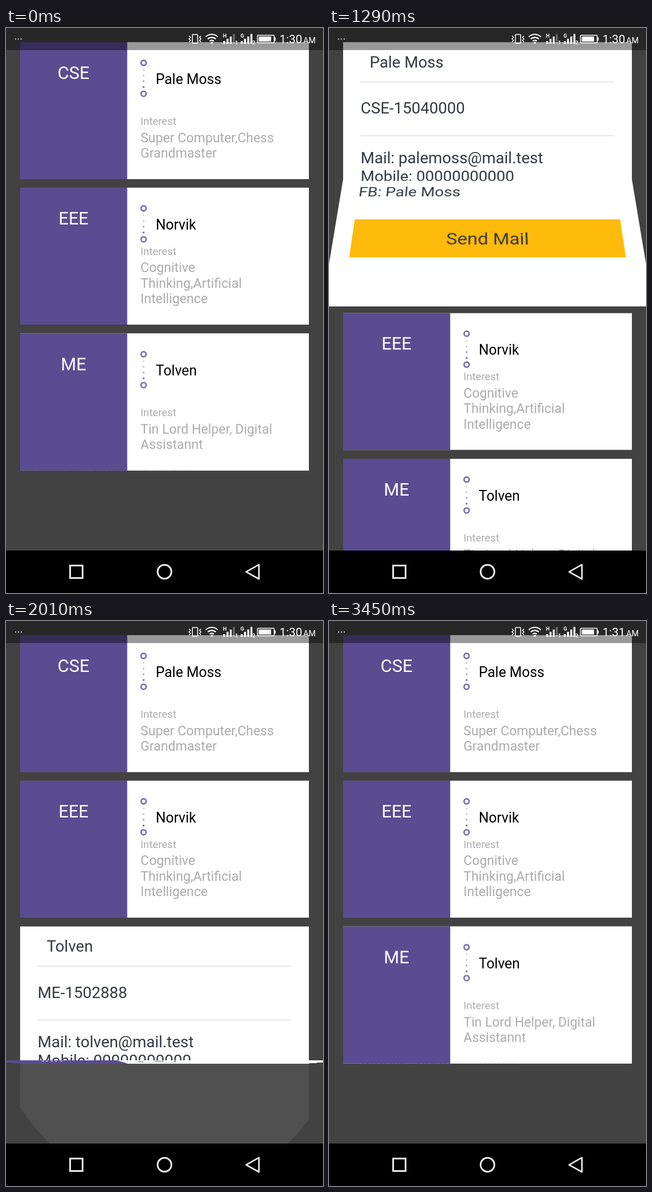
An HTML page that plays this animation: 561x998 px, repeating every 3.51 s.

```html
<!DOCTYPE html>
<html lang="en">
<head>
<meta charset="utf-8">
<title>Folding cards</title>
<style>
@property --turn { syntax: "<angle>"; inherits: true; initial-value: 0deg; }

html, body { margin: 0; width: 100%; height: 100%; overflow: hidden; background: #424242; }
.stage {
  position: relative; width: 561px; height: 998px; overflow: hidden;
  background: #424242; font-family: Roboto, sans-serif;
  --loop: 3510ms; --ease: cubic-bezier(.3333, .6667, .6667, 1);
}
.stage svg { display: block; position: absolute; }
.stage text { font-family: Roboto, sans-serif; white-space: pre; }

.cell { position: absolute; left: 25px; width: 511px; height: 242px; }
.one { top: 25px; animation: fold-one var(--loop) var(--ease) infinite; }
.two { top: 282px; }
.three { top: 540px; translate: 0 -.4px; animation: fold-three var(--loop) var(--ease) infinite; }
.rest { position: absolute; left: 0; top: 0; width: 561px; animation: push var(--loop) var(--ease) infinite; }

.face { left: 0; top: 0; width: 511px; height: 242px; overflow: hidden; }
.cover {
  transform-origin: 50% 100%;
  transform: perspective(1122px) rotateX(calc(-1 * min(var(--turn), 90deg)));
}
.flap {
  top: 242px; height: 243px; transform-origin: 50% 0;
  transform: perspective(1122px) rotateX(min(180deg - var(--turn), 90deg));
}
.ripple {
  position: absolute; left: 0; top: 0; width: 511px; height: 242px; background: #fff; opacity: 0;
  animation: ripple var(--loop) linear infinite, stretch var(--loop) var(--ease) infinite;
}
.three .ripple { animation-delay: -1743ms; }

.tag { font-size: 31.2px; fill: #fff; text-anchor: middle; }
.name { font-size: 24.9px; fill: #000; }
.hint { font-size: 18.7px; fill: #acacac; }
.note { font-size: 23.3px; fill: #acacac; }
.info { font-size: 28.04px; fill: #333a44; }
.send { font-size: 31.2px; fill: #333a44; text-anchor: middle; }

.bars { left: 0; top: 0; }
.early { animation: early var(--loop) step-end infinite; }
.late { opacity: 0; animation: late var(--loop) step-end infinite; }

@keyframes fold-one {
  0%, .598% { --turn: 0deg; }
  7.721% { --turn: 90deg; }
  14.843%, 35.57% { --turn: 180deg; }
  40.9% { --turn: 90deg; }
  46.23%, 100% { --turn: 0deg; }
}
@keyframes fold-three {
  0%, 50.94% { --turn: 0deg; }
  58.063% { --turn: 90deg; }
  65.185%, 87.664% { --turn: 180deg; }
  92.991% { --turn: 90deg; }
  98.319%, 100% { --turn: 0deg; }
}
@keyframes push {
  0%, .74% { transform: translateY(0); }
  14.985%, 36.296% { transform: translateY(243px); }
  46.952%, 100% { transform: translateY(0); }
}
@keyframes stretch {
  0%, .74% { height: 242px; }
  14.985%, 100% { height: 485px; }
}
@keyframes ripple {
  0%, .598% { opacity: 0; clip-path: circle(0 at 263px 158px); }
  2.5% { opacity: .074; }
  6.923% { opacity: .074; clip-path: circle(307px at 263px 158px); }
  9.402% { opacity: .025; clip-path: circle(420px at 263px 158px); }
  11.4%, 100% { opacity: 0; clip-path: circle(480px at 263px 158px); }
}
@keyframes early { 0% { opacity: 1; } 93.16%, 100% { opacity: 0; } }
@keyframes late { 0% { opacity: 0; } 93.16%, 100% { opacity: 1; } }
</style>
</head>
<body>
<div class="stage">

  <svg width="0" height="0">
    <defs>
      <g id="title">
        <rect width="511" height="242" fill="#fff"/>
        <rect width="189.5" height="242" fill="#594c91"/>
        <g fill="none" stroke="#7467ab" stroke-width="2.6">
          <circle cx="218.5" cy="36.6" r="4.5"/>
          <circle cx="218.5" cy="91.2" r="4.5"/>
        </g>
        <g fill="#7467ab">
          <circle cx="218.5" cy="49" r="1.5" opacity=".35"/>
          <circle cx="218.5" cy="59" r="1.5" opacity=".5"/>
          <circle cx="218.5" cy="69" r="1.6" opacity=".7"/>
          <circle cx="218.5" cy="79.3" r="1.7" opacity=".95"/>
        </g>
      </g>
      <g id="sheet">
        <rect width="511" height="485" fill="#fff"/>
        <path d="M31 70.2h449M31 165.2h449" stroke="#dfdfdf" stroke-width="1.6"/>
        <rect x="31" y="326" width="449" height="73" fill="#ffbb0b"/>
        <text class="send" x="255.5" y="375">Send Mail</text>
      </g>
      <g id="detail-one">
        <use href="#sheet"/>
        <g class="info">
          <text x="47" y="44.5">Pale Moss</text>
          <text x="31" y="126">CSE-15040000</text>
          <text x="31" y="213.6">Mail: palemoss@mail.test</text>
          <text x="31" y="246.5">Mobile: 00000000000</text>
          <text x="31" y="279.4">FB: Pale Moss</text>
        </g>
      </g>
      <g id="detail-three">
        <use href="#sheet"/>
        <g class="info">
          <text x="47" y="44.5">Tolven</text>
          <text x="31" y="126">ME-1502888</text>
          <text x="31" y="213.6">Mail: tolven@mail.test</text>
          <text x="31" y="246.5">Mobile: 00000000000</text>
          <text x="31" y="279.4">FB: Tolven</text>
        </g>
      </g>
    </defs>
  </svg>

  <div class="rest">
    <div class="cell two">
      <svg class="face" viewBox="0 0 511 242">
        <use href="#title"/>
        <text class="tag" x="94.5" y="65">EEE</text>
        <text class="name" x="240" y="74">Norvik</text>
        <text class="hint" x="213" y="119">Interest</text>
        <text class="note" x="213" y="149.2">Cognitive</text>
        <text class="note" x="213" y="176.7">Thinking,Artificial</text>
        <text class="note" x="213" y="204.2">Intelligence</text>
      </svg>
    </div>
    <div class="cell three">
      <div class="ripple"></div>
      <svg class="face" viewBox="0 0 511 242"><use href="#detail-three"/></svg>
      <svg class="face flap" viewBox="0 242 511 243"><use href="#detail-three"/></svg>
      <svg class="face cover" viewBox="0 0 511 242">
        <use href="#title"/>
        <text class="tag" x="94.5" y="64.8">ME</text>
        <text class="name" x="240" y="73.7">Tolven</text>
        <text class="hint" x="213" y="146">Interest</text>
        <text class="note" x="213" y="176.5">Tin Lord Helper, Digital</text>
        <text class="note" x="213" y="204">Assistannt</text>
      </svg>
    </div>
  </div>

  <div class="cell one">
    <div class="ripple"></div>
    <svg class="face" viewBox="0 0 511 242"><use href="#detail-one"/></svg>
    <svg class="face flap" viewBox="0 242 511 243"><use href="#detail-one"/></svg>
    <svg class="face cover" viewBox="0 0 511 242">
      <use href="#title"/>
      <text class="tag" x="94.5" y="65">CSE</text>
      <text class="name" x="240" y="73.5">Pale Moss</text>
      <text class="hint" x="213" y="146">Interest</text>
      <text class="note" x="213" y="176.5">Super Computer,Chess</text>
      <text class="note" x="213" y="204">Grandmaster</text>
    </svg>
  </div>

  <svg class="bars" width="561" height="998" viewBox="0 0 561 998">
    <rect width="561" height="39" fill="#000" opacity=".4"/>
    <g fill="#fff">
      <path d="M16 18.5h2v2h-2zM21 18.5h2v2h-2zM26 18.5h2v2h-2z" opacity=".8"/>
      <!-- vibrate -->
      <g fill="none" stroke="#fff" stroke-width="1.5">
        <rect x="329.8" y="11.5" width="9.4" height="15.5" rx="1"/>
        <path d="M324 14l2.6 2.6-2.6 2.7 2.6 2.7-2.6 2.6M345 14l-2.6 2.6 2.6 2.7-2.6 2.7 2.6 2.6"/>
      </g>
      <!-- wifi -->
      <g fill="none" stroke="#fff" stroke-width="2.1">
        <path d="M353.5 15.8a15 15 0 0 1 21.4 0M357 19.6a10.2 10.2 0 0 1 14.4 0M360.4 23.2a5.4 5.4 0 0 1 7.6 0"/>
      </g>
      <circle cx="364.2" cy="26" r="1.9"/>
      <!-- signal -->
      <path d="M384.5 23h3.4v5h-3.4zM390.3 19h3.4v9h-3.4zM396 15h3.4v13H396z"/>
      <path d="M401.5 10.5h3.4V28h-3.4z" opacity=".3"/>
      <path d="M415.5 23h3.4v5h-3.4zM421.3 19h3.4v9h-3.4zM427 15h3.4v13H427zM432.6 10.5h3.4V28h-3.4z"/>
      <g font-size="9" font-weight="700">
        <text x="384" y="16.5">H</text>
        <text x="415" y="16.5">G</text>
        <text x="405.5" y="29">1</text>
        <text x="436" y="29">2</text>
      </g>
      <!-- battery -->
      <rect x="445" y="12.7" width="29.5" height="13.6" rx="1" fill="none" stroke="#fff" stroke-width="1.5"/>
      <path d="M447.2 14.9h22v9.2h-22zM475.2 16.5h2v6h-2z"/>
      <g font-size="20.8">
        <text class="early" x="484" y="27">1:30</text>
        <text class="late" x="484" y="27">1:31</text>
      </g>
      <text x="526" y="27" font-size="14.5">AM</text>
    </g>

    <rect y="923" width="561" height="75" fill="#000"/>
    <g fill="none" stroke="#ececec" stroke-width="3">
      <rect x="113.5" y="949.5" width="22" height="22"/>
      <circle cx="280.5" cy="960.5" r="12.2"/>
      <path d="M425 960.6L447.6 947.9V973.3z" stroke-width="2.7" stroke-linejoin="round"/>
    </g>
  </svg>
</div>
</body>
</html>
```
